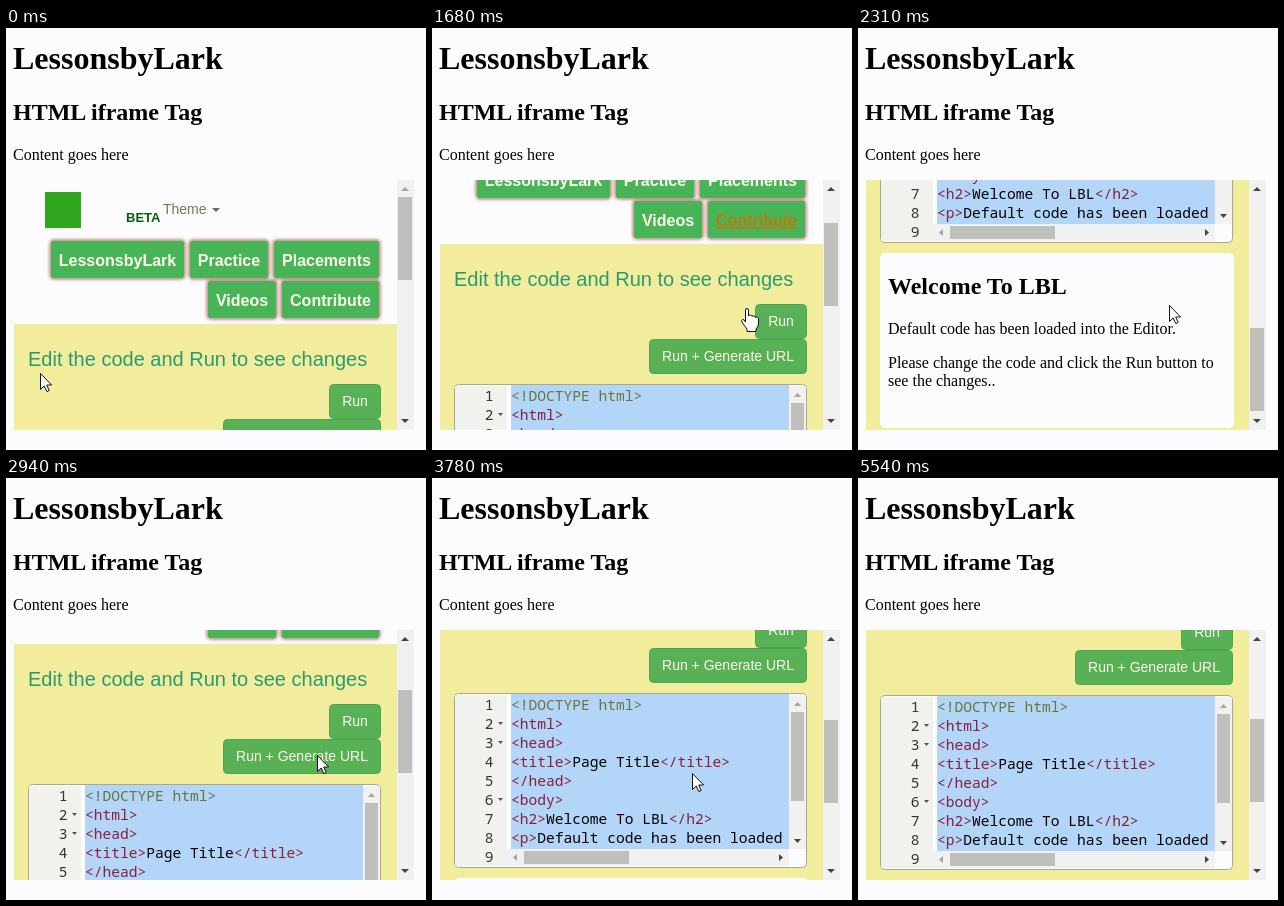
Recreate the animation shown at these times as an HTML page. Size 420x422 px, loop 5760 ms.

```html
<!DOCTYPE html>
<html lang="en">
<head>
<meta charset="utf-8">
<title>HTML iframe Tag</title>
<style>
  html, body { margin: 0; width: 100%; height: 100%; overflow: hidden; background: #fcfcfe; }
  svg { display: block; width: 100%; height: 100%; }
  text { white-space: pre; }
  .serif { font: 16px "Liberation Serif", serif; }
  .h1 { font-size: 32px; font-weight: bold; }
  .h2 { font-size: 24px; font-weight: bold; }
  .sans { font: 14px "Liberation Sans", sans-serif; }
  .nav { font: bold 16px "Liberation Sans", sans-serif; fill: #fdfce6; text-anchor: middle; }
  .nav.hover { fill: #c4780c; text-decoration: underline; }
  .mono { font: 14.6px "Noto Sans Mono", monospace; }
  .tag { fill: #861f3c; }
  .doctype { fill: #68743e; }
</style>
</head>
<body>
<svg viewBox="0 0 420 422" id="stage">
  <defs>
    <clipPath id="view"><rect x="8" y="152" width="383" height="250"/></clipPath>
    <clipPath id="gutterClip"><rect x="23" y="437" width="53" height="173"/></clipPath>
    <clipPath id="codeClip"><rect x="75" y="437" width="282" height="155"/></clipPath>
    <filter id="glow" x="-10%" y="-20%" width="120%" height="140%"><feGaussianBlur stdDeviation="1.4"/></filter>
  </defs>
  <rect width="420" height="422" fill="#fcfcfe"/>
  <g class="serif">
    <text class="h1" x="7" y="41">LessonsbyLark</text>
    <text class="h2" x="7" y="92">HTML iframe Tag</text>
    <text x="7" y="132">Content goes here</text>
  </g>

  <g clip-path="url(#view)">
    <g id="page">
      <rect x="8" y="296" width="383" height="520" fill="#f1ed9c"/>
      <rect x="39" y="164" width="36" height="36" fill="#2fa51f"/>
      <text class="sans" x="120" y="194" fill="#0b5a0c" style="font-size:13px;font-weight:bold">BETA</text>
      <text class="sans" x="157" y="186" fill="#77764f">Theme</text>
      <path d="M206 180h8l-4 4z" fill="#6b6a50"/>
      <g id="nav"></g>
      <text class="sans" x="22" y="338" fill="#2b9a72" style="font-size:20px">Edit the code and Run to see changes</text>
      <g id="run"></g>

      <rect x="22.5" y="436.5" width="352" height="174" rx="4" fill="#fcfcfe" stroke="#a9a893"/>
      <rect x="23" y="438" width="52" height="171" fill="#f1f1ee"/>
      <g clip-path="url(#gutterClip)"><g id="gutter" class="mono"></g></g>
      <g clip-path="url(#codeClip)"><g id="code" class="mono"></g></g>
      <g id="bars"></g>

      <rect x="22" y="621" width="354" height="175" rx="5" fill="#fcfcfe"/>
      <g class="serif">
        <text class="h2" x="30" y="662">Welcome To LBL</text>
        <text x="30" y="702">Default code has been loaded into the Editor.</text>
        <text x="30" y="736">Please change the code and click the Run button to</text>
        <text x="30" y="754">see the changes..</text>
      </g>
    </g>
  </g>

  <rect x="391" y="152" width="17" height="250" fill="#f1f1f1"/>
  <rect id="thumb" x="392" y="169" width="14" height="83" fill="#bfbfbb"/>
  <path id="up" d="M395 163h8l-4-4z"/>
  <path d="M395 391h8l-4 4z" fill="#444"/>

  <g id="cursor" stroke="#111" fill="#fff" stroke-linejoin="round">
    <path id="arrow" d="M.5.5V16.5L4.2 13 6.8 18.6 9.2 17.5 6.7 12H11.6Z"/>
    <path id="hand" d="M-1.5 14V2Q-1.5.5 0 .5T1.5 2V8Q2 6.6 3.5 7T5 8.5Q5.5 7.4 7 8T8.5 9.5Q9 8.8 10.3 9.4T11.5 11V16Q11 19 9 21V23.5H0V21Q-2.5 18-5 14Q-6 12-4.5 11.5T-1.5 14Z"/>
  </g>
</svg>

<script>
const LOOP = 5760, LINE = 19;
const $ = id => document.getElementById(id);

function add(parent, tag, attrs, text) {
  const el = document.createElementNS("http://www.w3.org/2000/svg", tag);
  for (const k in attrs) el.setAttribute(k, attrs[k]);
  if (text !== undefined) el.textContent = text;
  parent.appendChild(el);
  return el;
}

function navButton(label, x, y, width) {
  const box = { x, y, width, height: 37, rx: 3 };
  add($("nav"), "rect", { ...box, fill: "none", stroke: "#b5786c", "stroke-width": 3, filter: "url(#glow)" });
  add($("nav"), "rect", { ...box, fill: "#46b457" });
  return add($("nav"), "text", { class: "nav", x: x + width / 2, y: y + 25 }, label);
}
navButton("LessonsbyLark", 45, 213, 133);
navButton("Practice", 184, 213, 78);
navButton("Placements", 268, 213, 105);
navButton("Videos", 202, 253, 68);
const contribute = navButton("Contribute", 276, 253, 97);

function runButton(label, x, y, width) {
  add($("run"), "rect", { x: x + .5, y: y + .5, width: width - 1, height: 34, rx: 4, fill: "#58b156", stroke: "#4ca64b" });
  add($("run"), "text", { class: "sans", x: x + width / 2, y: y + 22, fill: "#fdfce6", "text-anchor": "middle" }, label);
}
runButton("Run", 323, 356, 52);
runButton("Run + Generate URL", 217, 391, 158);

const source = [
  "<!DOCTYPE html>", "<html>", "<head>", "<title>Page Title</title>", "</head>", "<body>",
  "<h2>Welcome To LBL</h2>",
  "<p>Default code has been loaded into the Editor.</p>",
  "<p>Please change the code and click the Run button to see the changes..</p>",
  "</body>", "</html>"
];
add($("code"), "rect", { x: 79, y: 437, width: 290, height: LINE * source.length + 3, fill: "#b3d6f8" });
add($("gutter"), "rect", { x: 23, y: 437 + LINE * 10, width: 52, height: LINE, fill: "#dcdcd8" });
source.forEach((line, i) => {
  const y = 453 + i * LINE;
  add($("gutter"), "text", { x: 61.5, y, fill: "#333", "text-anchor": "end" }, i + 1);
  if ([1, 2, 5].includes(i)) add($("gutter"), "path", { d: `M66 ${y - 7}h5l-2.5 3z`, fill: "#555" });
  const row = add($("code"), "text", { x: 79, y });
  for (const part of line.match(/<[^>]+>|[^<]+/g)) {
    const kind = part.startsWith("<!") ? "doctype" : part[0] === "<" ? "tag" : "";
    add(row, "tspan", { class: kind }, part);
  }
});

const bars = $("bars");
add(bars, "rect", { x: 357, y: 438, width: 17, height: 154, fill: "#f1f1f1" });
add(bars, "rect", { x: 75, y: 592, width: 282, height: 17, fill: "#f1f1f1" });
add(bars, "rect", { x: 92, y: 594, width: 105, height: 13, fill: "#bfbfbb" });
add(bars, "path", { d: "M85 597v7l-4-3.500z", fill: "#a5a5a0" });
add(bars, "path", { d: "M347 597v7l4-3.500z", fill: "#444" });
add(bars, "path", { d: "M362 582h7l-3.500 4z", fill: "#444" });
const editUp = add(bars, "path", { d: "M362 449h7l-3.500-4z" });
const editThumb = add(bars, "rect", { x: 359, width: 13, height: 89, fill: "#bfbfbb" });

// Keys are [time, ...values]
const pageKeys = [[1490, 0], [1560, 22], [1680, 79], [2230, 376], [2310, 396], [2390, 398], [2440, 396],
  [3130, 30], [3230, 0], [3340, 0], [3360, 1], [3440, 32], [3700, 190], [3780, 221], [4200, 221], [4260, 219]];
const editKeys = [[4560, 0], [4700, 30], [4830, 57], [5040, 57], [5400, 16], [5540, 0]];
const cursorKeys = [[130, 34, 345], [400, 150, 285], [670, 256, 224], [709, 256, 224], [710, 315, 261],
  [1260, 315, 261], [1420, 315, 280], [1680, 315, 280], [2310, 311, 277], [3120, 311, 277], [3300, 295, 286],
  [3400, 295, 286], [3780, 260, 295], [4300, 260, 295], [4700, 230, 296], [4960, 230, 296], [5310, 245, 425]];

function at(keys, t) {
  const i = keys.findIndex(k => k[0] > t);
  if (i === 0) return keys[0].slice(1);
  if (i < 0) return keys[keys.length - 1].slice(1);
  const a = keys[i - 1], b = keys[i], u = (t - a[0]) / (b[0] - a[0]);
  return a.slice(1).map((v, j) => Math.round(v + (b[j + 1] - v) * u));
}
const shift = (el, x, y) => el.setAttribute("transform", `translate(${x} ${y})`);
const arrowColor = scroll => scroll ? "#444" : "#a5a5a0";

function draw(t) {
  const [scroll] = at(pageKeys, t), [edit] = at(editKeys, t), [x, y] = at(cursorKeys, t);
  shift($("page"), 0, -scroll);
  $("thumb").setAttribute("y", 169 + Math.round(scroll * .33));
  $("up").setAttribute("fill", arrowColor(scroll));
  shift($("gutter"), 0, -edit);
  shift($("code"), 0, -edit);
  editThumb.setAttribute("y", 455 + Math.round(edit * .54));
  editUp.setAttribute("fill", arrowColor(edit));

  const hover = (t >= 1260 && t < 2000) || (t >= 3230 && t < 3480);
  contribute.classList.toggle("hover", hover);
  $("hand").style.display = hover ? "" : "none";
  $("arrow").style.display = hover ? "none" : "";
  shift($("cursor"), x, y);
}

const start = performance.now();
function tick() {
  draw((performance.now() - start) % LOOP);
  requestAnimationFrame(tick);
}
tick();
</script>
</body>
</html>
```
